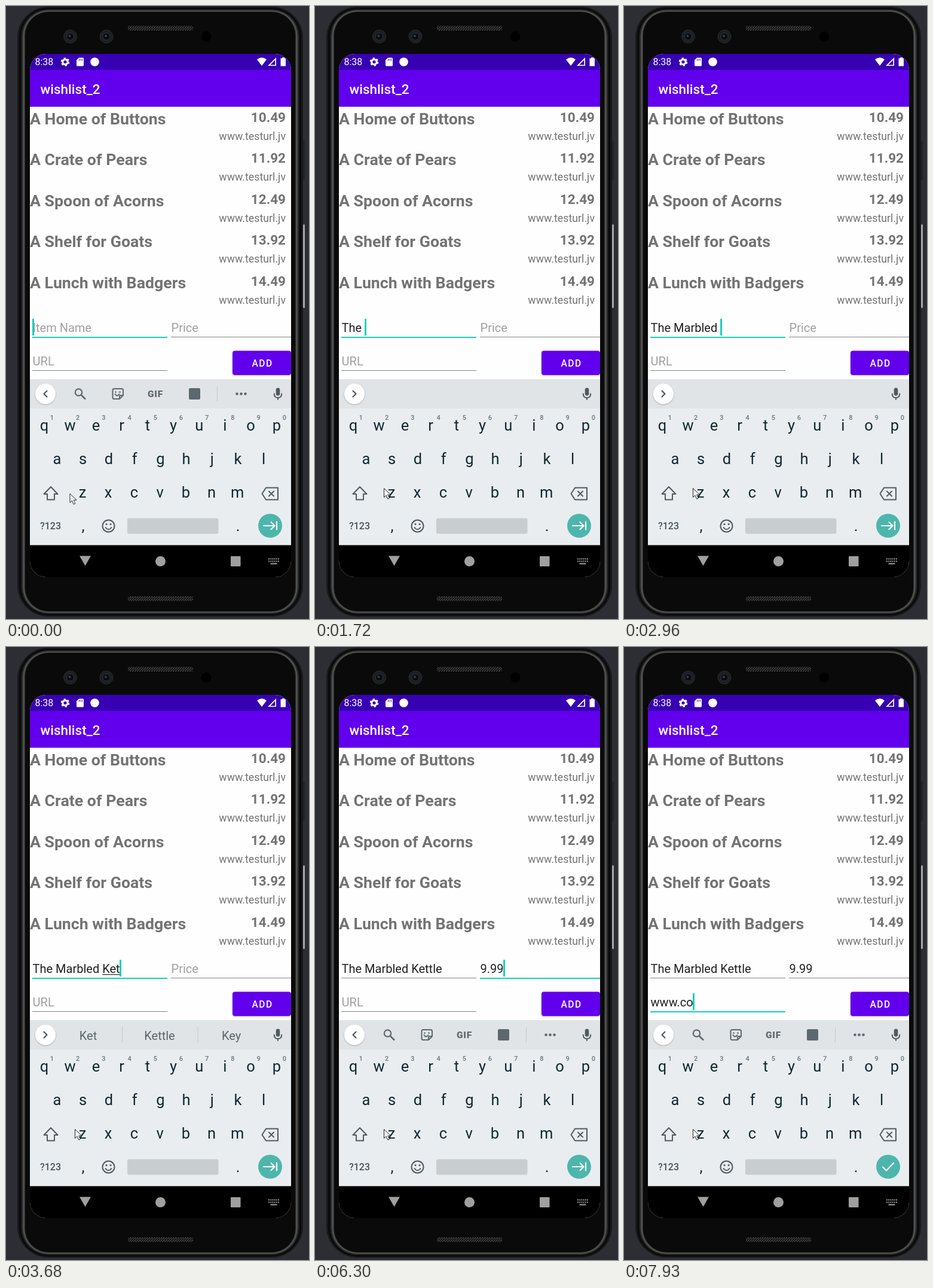
An HTML page that plays this animation: 507 px wide and 1025 px high, repeating every 8000 ms.

```html
<!DOCTYPE html>
<html lang="en">
<head>
<meta charset="utf-8">
<title>Wishlist entry</title>
<style>
  html, body { margin: 0; width: 100%; height: 100%; overflow: hidden; background: #2c2e34; }
  svg { display: block; width: 100%; height: 100%; font-family: Roboto, sans-serif; }
  text { white-space: pre; }
  .mid { text-anchor: middle; }
  .end { text-anchor: end; }
  .line { fill: none; stroke-linecap: round; stroke-linejoin: round; }
  .title { font: 700 26.7px Roboto, sans-serif; }
  .price { font: 700 22.5px Roboto, sans-serif; }
  .entry { font-size: 20px; }
</style>
</head>
<body>
<svg viewBox="0 0 507 1025">
  <defs>
    <clipPath id="screen"><rect x="40" y="80" width="437" height="875" rx="27"/></clipPath>
    <pattern id="mesh" width="4" height="4" patternUnits="userSpaceOnUse">
      <rect width="4" height="4" fill="#161616"/>
      <path d="M0 4L4 0M0 0l1 1" stroke="#4a4a4a"/>
    </pattern>
    <filter id="soft" x="-20%" y="-20%" width="140%" height="150%">
      <feDropShadow dx="0" dy="1" stdDeviation="1.2" flood-opacity=".3"/>
    </filter>
  </defs>

  <!-- phone body -->
  <rect width="507" height="1025" fill="#2c2e34"/>
  <rect x="495" y="225" width="5" height="66" rx="2" fill="#222327"/>
  <rect x="497" y="365" width="3" height="140" rx="1.500" fill="#a9a9ab"/>
  <g id="rim"></g>
  <rect x="204" y="33" width="109" height="8" rx="3" fill="url(#mesh)"/>
  <rect x="204" y="987" width="109" height="8" rx="3" fill="url(#mesh)"/>
  <g id="lenses"></g>
  <circle cx="335" cy="51" r="8.5" fill="#000"/>

  <g clip-path="url(#screen)">
    <rect x="40" y="80" width="437" height="875" fill="#fefefe"/>
    <rect x="40" y="80" width="437" height="27" fill="#3700b3"/>
    <rect x="40" y="107" width="437" height="61.500" fill="#6200ee"/>

    <!-- status bar -->
    <g fill="#fff">
      <text x="48.5" y="99" font-size="16">8:38</text>
      <circle cx="99" cy="93.5" r="4.2" fill="none" stroke="#fff" stroke-width="3.2"/>
      <circle cx="99" cy="93.5" r="6.3" fill="none" stroke="#fff" stroke-width="2" stroke-dasharray="3.3 3.3"/>
      <path d="M122 86.5h6.500q1.500 0 1.500 1.500v11q0 1.500-1.500 1.500h-9q-1.500 0-1.500-1.500v-8.500z"/>
      <path d="M122.500 88.500v3m2.500-3v3m2.500-3v3" stroke="#3700b3"/>
      <circle cx="148.500" cy="93.500" r="7.300"/>
      <path d="M420 89.500q8-6.500 16 0l-8 10.500z"/>
      <path d="M452 86v14h-14zM450.300 90.300v8.200h-8.200z" fill-rule="evenodd"/>
      <path d="M462 86h4v1.500h2v13h-8.500v-13h2.500z"/>
    </g>
    <text x="57.500" y="147" font-size="22.500" font-weight="500" fill="#fff">wishlist_2</text>

    <g id="list" fill="#737373"></g>

    <!-- entry form -->
    <g id="form"></g>
    <rect id="caret" width="3" height="28" fill="#18cfbd"/>
    <rect id="compose" y="547" height="1.300" fill="#333"/>
    <rect x="379" y="576.500" width="98" height="40.500" rx="4" fill="#6200ee" filter="url(#soft)"/>
    <text class="mid" x="429" y="603" font-size="15.600" font-weight="500" letter-spacing="1.400" fill="#fff">ADD</text>

    <!-- keyboard -->
    <rect x="40" y="624" width="437" height="49" fill="#e0e4e6"/>
    <rect x="40" y="673" width="437" height="229" fill="#e9edf0"/>
    <circle cx="66" cy="648.500" r="17" fill="#fff" filter="url(#soft)"/>
    <path id="chevron" class="line" stroke="#455057" stroke-width="2"/>
    <g id="tools" fill="#5d686e" stroke="#5d686e" stroke-width="0">
      <circle cx="121.500" cy="646" r="5.700" fill="none" stroke-width="2.200"/>
      <path d="M126 650.500l7 7" stroke-width="2.700"/>
      <path class="line" d="M181 640h12.500q2.500 0 2.500 2.500v8.500l-6 6h-9q-2.500 0-2.500-2.500v-12q0-2.500 2.500-2.500zM196 651h-4q-2 0-2 2v4M182.500 649q3.500 5 7 0" stroke-width="2"/>
      <circle cx="183.500" cy="645.500" r="1.300"/><circle cx="190.500" cy="645.500" r="1.300"/>
      <text class="mid" x="250" y="654" font-size="15.500" font-weight="900" letter-spacing=".8">GIF</text>
      <rect x="306" y="639" width="19" height="19" rx="2"/>
      <path d="M353.500 636v25" stroke="#c4cacd" stroke-width="1"/>
      <circle cx="386.500" cy="648.500" r="2.300"/><circle cx="393.500" cy="648.500" r="2.300"/><circle cx="400.500" cy="648.500" r="2.300"/>
    </g>
    <g id="words" class="mid entry" fill="#59646a"></g>
    <path id="bars" d="M194.500 635v27M321 635v27" stroke="#c4cacd"/>
    <g stroke="#4f5a60" class="line" stroke-width="2">
      <rect x="451.700" y="638.500" width="6.600" height="13" rx="3.300" fill="#4f5a60" stroke="none"/>
      <path d="M448.800 648.500q0 6.500 6.200 6.500t6.200-6.500M455 655v3"/>
      <path d="M75 804l11.500 12h-5.500v9.500h-12v-9.500h-5.500z"/>
      <path d="M435 805.500h20v20h-20l-6.500-10zM440 811.500l8 8m0-8l-8 8"/>
      <circle cx="171.500" cy="869.500" r="10"/>
      <path d="M166.500 872q5 6.500 10 0"/>
      <path d="M168 866.500h.1M175 866.500h.1" stroke-width="3"/>
    </g>
    <g id="keys" class="mid" fill="#12272f" font-size="25.500"></g>
    <text class="mid" x="74.500" y="875" font-size="16" font-weight="500" fill="#46535a">?123</text>
    <rect x="203" y="856.500" width="152.500" height="26" rx="3" fill="#c8cdd0"/>
    <circle cx="442" cy="869" r="20" fill="#4db6ac"/>
    <path id="action" class="line" stroke="#fff" stroke-width="2.200"/>

    <!-- navigation bar -->
    <rect x="40" y="901.500" width="437" height="54" fill="#000"/>
    <g fill="#a0a0a0">
      <path d="M123 919.500h19l-9.500 16.500z"/>
      <circle cx="258.500" cy="928.500" r="8.500"/>
      <rect x="376" y="920" width="16.500" height="17" rx="1"/>
      <path d="M439 924.500h18M439 928.500h18" stroke="#a0a0a0" stroke-width="2" stroke-dasharray="2 1.200"/>
      <path d="M442.500 932.500h11" stroke="#a0a0a0" stroke-width="2"/>
    </g>
  </g>
  <path id="mouse" d="M0 0v15l3.500-3.300 2.700 6 2.700-1.200-2.700-5.800h4.800z" fill="#fff" stroke="#222"/>
</svg>

<script>
const LOOP = 8000;
const $ = id => document.getElementById(id);

function add(parent, tag, attrs, text = "") {
  const el = document.createElementNS("http://www.w3.org/2000/svg", tag);
  set(el, attrs);
  el.textContent = text;
  return $(parent).appendChild(el);
}
function set(el, attrs) {
  for (const key in attrs) el.setAttribute(key, attrs[key]);
}
function show(el, on) {
  el.style.display = on ? "" : "none";
}

// nested outlines shade the metal edge from outside to inside
[[0, "#17181a"], [3, "#090909"], [6, "#1b1b1b"], [8, "#3a3a3a"], [10, "#5c5c5c"],
  [11.5, "#303030"], [13, "#0a0a0a"]].forEach(([inset, fill]) =>
  add("rim", "rect", {
    x: 19 + inset, y: 1 + inset * .7, rx: 52 - inset,
    width: 478 - 2 * inset, height: 1020 - 1.4 * inset, fill
  }));

for (const x of [107.5, 168]) {
  add("lenses", "circle", { cx: x, cy: 51, r: 11, fill: "#1c1f22", stroke: "#292c2f" });
  add("lenses", "circle", { cx: x, cy: 51, r: 6, fill: "#090b0e", stroke: "#30353c" });
  add("lenses", "circle", { cx: x - 1, cy: 50, r: 2, fill: "#33404f" });
}

const books = [
  ["A Home of Buttons", "10.49"],
  ["A Crate of Pears", "11.92"],
  ["A Spoon of Acorns", "12.49"],
  ["A Shelf for Goats", "13.92"],
  ["A Lunch with Badgers", "14.49"]
];
books.forEach(([title, price], i) => {
  const y = i * 68.5;
  add("list", "text", { class: "title", x: 40, y: 197.5 + y }, title);
  add("list", "text", { class: "price end", x: 468, y: 193.5 + y }, price);
  add("list", "text", { class: "end", x: 468, y: 223.5 + y, "font-size": 17.8 }, "www.testurl.jv");
});

[["qwertyuiop", 64, 710], ["asdfghjkl", 85.5, 766], ["zxcvbnm", 128, 822]].forEach(([row, x, y]) => {
  [...row].forEach((key, i) => add("keys", "text", { x: x + i * 43.2, y }, key));
});
[..."1234567890"].forEach((digit, i) =>
  add("keys", "text", { x: 77 + i * 43.2, y: 692, "font-size": 11, "font-weight": 500, fill: "#69757b" }, digit));
add("keys", "text", { x: 129, y: 878 }, ",");
add("keys", "text", { x: 388, y: 878 }, ".");

const fields = {
  item: { hint: "Item Name", x: 44, y: 523, right: 270 },
  price: { hint: "Price", x: 276, y: 523, right: 477 },
  url: { hint: "URL", x: 44, y: 579, right: 270 }
};
for (const f of Object.values(fields)) {
  f.text = add("form", "text", { class: "entry", x: f.x + .6, y: f.y + 22 });
  f.rule = add("form", "rect", { x: f.x, y: f.y + 30, width: f.right - f.x });
}
const words = [137.5, 257, 377].map(x => add("words", "text", { x, y: 656.5 }));

// strip: null shows the toolbar, otherwise the suggested words
const start = { focus: "item", item: "", price: "", url: "", strip: null, caret: true, mouse: [107, 815.5] };
const type = (time, item, strip = "") => [time, { item, strip, caret: true }];
const steps = [
  [120, { caret: false }],
  [650, { caret: true }],
  type(930, "T", "T The Thanks"),
  [1060, { mouse: [115.5, 806.5] }],
  type(1190, "Th", "Th The Thanks"),
  type(1320, "The", "The They There"),
  type(1460, "The ", "The They There"),
  [1600, { strip: "" }],
  type(1870, "The M", "M My Me"),
  type(2120, "The Ma", "Ma May Making"),
  type(2380, "The Marb", "Marb Mark Marble"),
  type(2540, "The Marbl", "Marbl Marble Marbling"),
  type(2680, "The Marble", "Marble Marbled Marbles"),
  type(2960, "The Marbled "),
  type(3400, "The Marbled K", "K Know Kind"),
  type(3680, "The Marbled Ket", "Ket Kettle Key"),
  type(3810, "The Marbled Kett", "Kett Kettle Kettles"),
  type(3950, "The Marbled Kettl", "Kettl Kettle Kettles"),
  type(4080, "The Marbled Kettle", "Kettle Kettles Kettled"),
  [4510, { focus: "price" }],
  [4630, { strip: "" }],
  [4780, { strip: null }],
  [5030, { caret: false }],
  [5570, { caret: true }],
  [6020, { price: "9" }],
  [6160, { price: "9.9" }],
  [6300, { price: "9.99" }],
  [6830, { focus: "url", strip: "" }],
  ...[..."www.co"].map((_, i) => [7230 + i * 140, { url: "www.co".slice(0, i + 1), strip: null }])
];

const pen = document.createElement("canvas").getContext("2d");
function widthOf(text) {
  pen.font = "20px Roboto, sans-serif";
  return pen.measureText(text).width;
}

function draw(time) {
  const s = Object.assign({}, start, ...steps.filter(([at]) => at <= time).map(step => step[1]));

  for (const [name, f] of Object.entries(fields)) {
    const active = name === s.focus;
    f.text.textContent = s[name] || f.hint;
    set(f.text, { fill: s[name] ? "#212121" : "#a0a0a0" });
    set(f.rule, { height: active ? 2 : 1, fill: active ? "#18cfbd" : "#858585" });
  }

  const field = fields[s.focus];
  set($("caret"), { x: Math.round(field.x + widthOf(s[s.focus])), y: field.y });
  show($("caret"), s.caret);

  const word = s.item.split(" ").pop();
  set($("compose"), { x: 44.6 + widthOf(s.item) - widthOf(word), width: widthOf(word) });
  show($("compose"), s.focus === "item" && word);

  const suggestions = (s.strip || "").split(" ");
  words.forEach((el, i) => el.textContent = suggestions[i] || "");
  show($("tools"), s.strip === null);
  show($("bars"), s.strip);
  set($("chevron"), { d: s.strip === null ? "M68.500 643.500l-5 5 5 5" : "M63.500 643.500l5 5-5 5" });
  set($("action"), {
    d: s.focus === "url" ? "M433 869.500l6 6 12-12.500" : "M431 869h18M443.500 863l6 6-6 6M453 862.500v13"
  });
  set($("mouse"), { transform: `translate(${s.mouse})` });
}

function tick() {
  draw(performance.now() % LOOP);
  requestAnimationFrame(tick);
}
tick();
</script>
</body>
</html>
```
